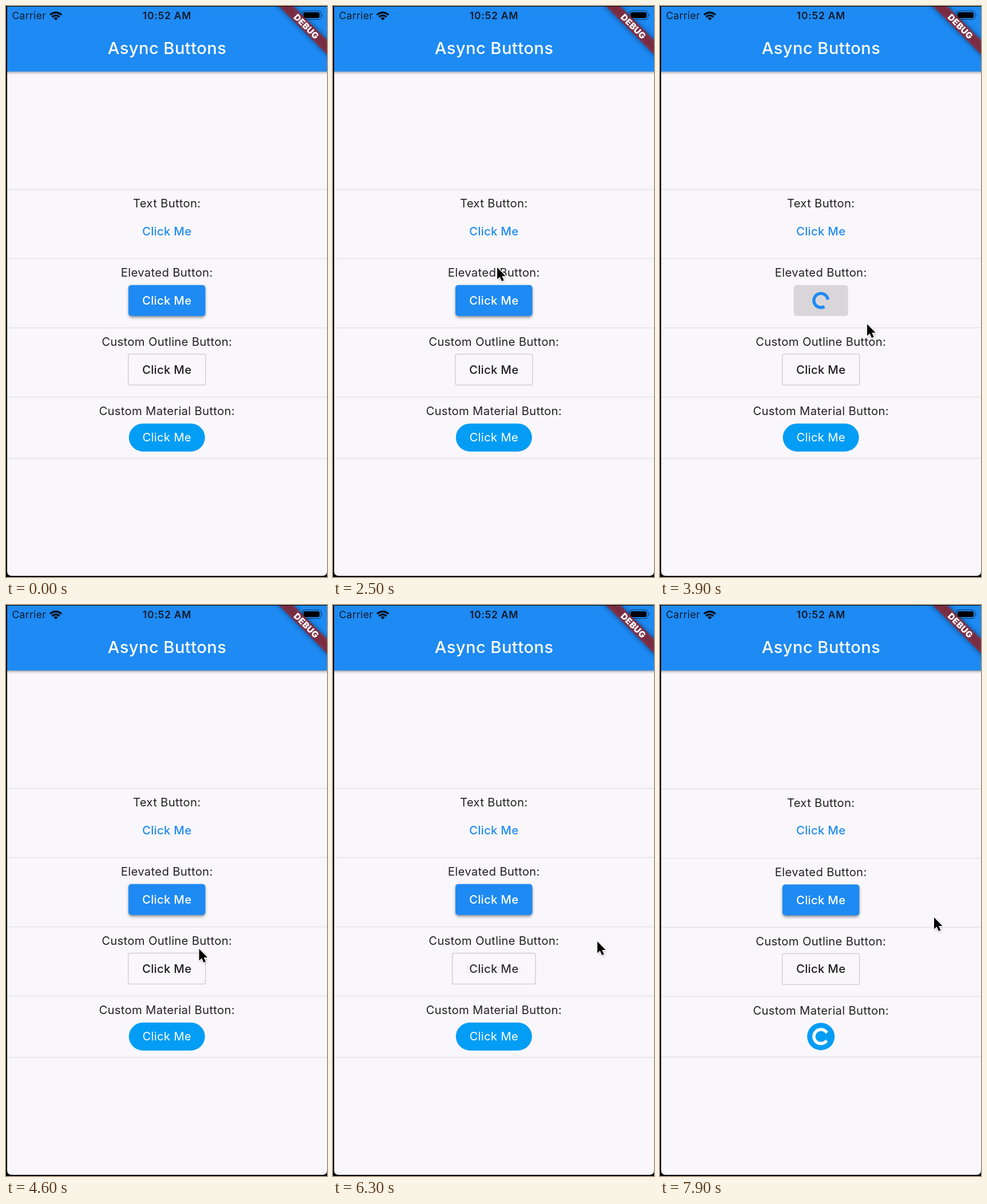
An HTML page for the animation above (8000 ms loop, 561 by 998 pixels).

```html
<!DOCTYPE html>
<html lang="en">
<head>
<meta charset="utf-8">
<title>Async Buttons</title>
<style>
  html, body { margin: 0; height: 100%; overflow: hidden; background: #000; }
  svg { display: block; width: 100vw; height: 100vh; }
  text { font: 400 20.3px Inter, Roboto, sans-serif; letter-spacing: .3px; text-anchor: middle; }
  .label { fill: #222124; }
  .medium { font-weight: 500; }
  .title { font-size: 29px; font-weight: 500; letter-spacing: .5px; fill: #fff; }
  .status { font-size: 17.4px; letter-spacing: .4px; fill: #0c1a2a; }
  .clock { font-weight: 600; letter-spacing: .8px; }
  .debug { font-size: 15.3px; font-weight: 900; fill: #fff; }
  .divider { stroke: #e5e3e7; stroke-width: 1.5; }
</style>
</head>
<body>
<svg viewBox="0 0 561 998" preserveAspectRatio="none">
  <defs>
    <filter id="blur" x="-20%" y="-60%" width="140%" height="220%"><feGaussianBlur stdDeviation="2.5"/></filter>
    <filter id="soft" x="-20%" y="-150%" width="140%" height="400%"><feGaussianBlur stdDeviation="5"/></filter>
    <clipPath id="screen"><path d="M2 1H561V988Q561 996 553 996H10Q2 996 2 988Z"/></clipPath>
  </defs>
  <g clip-path="url(#screen)">
    <rect width="561" height="998" fill="#f9f7fb"/>
    <rect x="-10" y="60" width="581" height="56" opacity=".42" filter="url(#blur)"/>
    <rect width="561" height="114.5" fill="#1e8af3"/>
    <text class="title" x="281.5" y="83.5">Async Buttons</text>
    <text class="status" x="40.3" y="23">Carrier</text>
    <text class="status clock" x="281.5" y="23">10:52 AM</text>
    <g transform="translate(87 25)" fill="none" stroke="#06101c" stroke-width="3.3">
      <path d="M-10-9.3A14 14 0 0 1 10-9.3"/>
      <path d="M-6.4-5.6A8.8 8.8 0 0 1 6.4-5.6"/>
      <path d="M0 0L-3.8-3.6A5.3 5.3 0 0 1 3.8-3.6Z" fill="#06101c" stroke="none"/>
    </g>
    <rect x="517.5" y="8.5" width="33" height="15" rx="4.5" fill="none" stroke="#000" stroke-opacity=".45" stroke-width="1.3"/>
    <rect x="520" y="11" width="28" height="10" rx="2.5"/>
    <path d="M552 13.5q2.5 2.5 0 5z" opacity=".5"/>
    <g id="list"></g>
    <g id="tail"></g>
    <g transform="translate(561 0) rotate(45)">
      <rect x="-90" y="41.9" width="180" height="18" opacity=".5" filter="url(#soft)"/>
      <rect x="-90" y="41.9" width="180" height="18" fill="#b71c1c" opacity=".63"/>
      <text class="debug" x="0" y="56.4">DEBUG</text>
    </g>
    <g id="cursor">
      <path d="M0 0V20.5L4.6 16.2 8 24 11.6 22.4 8.2 14.9H14.6Z" transform="translate(1 2)" opacity=".35" filter="url(#blur)"/>
      <path d="M0 0V20.5L4.6 16.2 8 24 11.6 22.4 8.2 14.9H14.6Z" stroke="#fff" stroke-width="2.6" paint-order="stroke"/>
    </g>
  </g>
</svg>
<script>
const LOOP = 8000, STEP = 100, FADE = 200, WAIT = 1000, CX = 281.2;
const $ = id => document.getElementById(id);
const clamp = v => Math.min(1, Math.max(0, v));
const mix = (a, b, p) => a + (b - a) * p;
const smooth = p => p * p * (3 - 2 * p);
const ease = p => (p = clamp(p), p < .5 ? 4 * p ** 3 : 1 - 4 * (1 - p) ** 3);
const rgba = (a, b, p) => `rgba(${a.map((v, i) => mix(v, b[i], p))})`;

function add(parent, tag, attrs, text) {
  const el = document.createElementNS('http://www.w3.org/2000/svg', tag);
  set(el, attrs);
  if (text) el.textContent = text;
  return parent.appendChild(el);
}
function set(el, attrs) {
  for (const k in attrs) el.setAttribute(k, attrs[k]);
}

const BLUE = '#1e8af3';
const CLEAR = [249, 247, 251, 0];
// w, h: size at rest; w2, h2: size while loading; start: when loading begins
const buttons = [
  { name: 'Text Button:', top: 320.7, y: 393.5, start: 1250, w: 135, w2: 95, h: 54, h2: 54, r: 5,
    fill: CLEAR, fill2: CLEAR, ink: BLUE, spin: BLUE, tap: [278, 394] },
  { name: 'Elevated Button:', top: 441.6, y: 514.7, start: 3200, w: 134.5, w2: 95, h: 54, h2: 54, r: 5,
    fill: [30, 138, 243, 1], fill2: [216, 214, 217, 1], ink: '#fff', spin: BLUE, tap: [283, 512], shadow: true },
  { name: 'Custom Outline Button:', top: 562.5, y: 635.5, start: 5120, w: 135, w2: 145.5, h: 54, h2: 54, r: 3,
    fill: CLEAR, fill2: [221, 219, 222, 1], ink: '#1d1c1f', tap: [303, 624], line: true },
  { name: 'Custom Material Button:', top: 683.4, y: 754.2, start: 7300, w: 133, w2: 48, h: 49, h2: 48, r: 25,
    fill: [4, 157, 245, 1], fill2: [4, 157, 245, 1], ink: '#fff', spin: '#fff', tap: [295, 748], plain: true }
];

function build(b, i) {
  const list = $('list'), holder = b.plain ? $('tail') : list;
  const base = b.y + (b.plain ? 6.8 : 7.1);
  add(list, 'path', { class: 'divider', d: `M2 ${b.top}H561` });
  add(list, 'text', { class: 'label', x: CX, y: b.top + 31.7 }, b.name);
  if (b.shadow) b.shade = add(holder, 'rect', { rx: b.r, filter: 'url(#blur)' });
  b.box = add(holder, 'rect', { rx: b.r });
  const clip = id => add(add(holder, 'clipPath', { id }), 'rect', { rx: b.r });
  b.edge = clip('edge' + i);
  b.inner = clip('inner' + i);
  const inkLayer = add(holder, 'g', { 'clip-path': `url(#edge${i})` });
  b.ripple = add(inkLayer, 'circle', { cx: b.tap[0], cy: b.tap[1], fill: b.ink });
  const content = add(holder, 'g', { 'clip-path': `url(#inner${i})` });
  b.idle = add(content, 'text', { class: b.plain ? '' : 'medium', x: CX, y: base, fill: b.ink }, 'Click Me');
  b.busy = b.spin
    ? add(content, 'path', { fill: 'none', stroke: b.spin, 'stroke-width': 5.4, 'stroke-linecap': 'square' })
    : add(content, 'text', { class: 'medium', x: CX, y: base, fill: '#878589' }, 'Loading...');
}
buttons.forEach(build);
const lastLine = add($('tail'), 'path', { class: 'divider', d: 'M2 790.8H561' });

// cubic-bezier(.4, 0, .2, 1)
function swift(x) {
  let lo = 0, hi = 1, u = .5;
  for (let i = 0; i < 20; i++) {
    u = (lo + hi) / 2;
    const v = 1.2 * u * (1 - u) ** 2 + .6 * u * u * (1 - u) + u ** 3;
    if (v < x) lo = u; else hi = u;
  }
  return 3 * u * u * (1 - u) + u ** 3;
}

function spinner(ms, cy) {
  const R = 12.3, p = ms / 1333 % 1;
  const head = swift(clamp(p * 2)), tail = swift(clamp(p * 2 - 1));
  const from = Math.PI * (-.5 + tail * 1.5 + ms / 2222 * 2 + p * .5);
  const sweep = Math.max((head - tail) * 1.5 * Math.PI, .01);
  const at = a => `${CX + R * Math.cos(a)} ${cy + R * Math.sin(a)}`;
  return `M${at(from)}A${R} ${R} 0 ${+(sweep > Math.PI)} 1 ${at(from + sweep)}`;
}

function setBox(el, w, h, y) {
  set(el, { x: CX - w / 2, y: y - h / 2, width: w, height: h });
}

function drawButton(b, t) {
  const on = t - b.start, off = on - WAIT;
  const load = clamp(on / FADE) - clamp(off / FADE);
  // The larger content rules the size until it has faded out.
  const size = b.spin
    ? ease((on - FADE) / 250) - ease(off / 250)
    : ease(on / 400) - ease((off - FADE) / 400);
  const w = mix(b.w, b.w2, size), h = mix(b.h, b.h2, size);
  setBox(b.box, w, h, b.y);
  setBox(b.edge, w, h, b.y);
  setBox(b.inner, mix(87, b.spin ? 46 : 97, size), 44, b.y);
  b.box.setAttribute('fill', rgba(b.fill, b.fill2, load));
  if (b.line) set(b.box, { stroke: rgba([209, 208, 211, 1], [196, 195, 198, 1], load), 'stroke-width': 1.5 });
  if (b.shade) {
    setBox(b.shade, w - 1, h, b.y + 2.5);
    b.shade.setAttribute('opacity', .45 * (1 - load));
  }
  const held = on + 120;
  set(b.ripple, {
    r: Math.min(80, Math.max(0, held * .28)),
    opacity: held > 0 ? .12 * (1 - clamp(on / FADE)) : 0
  });
  b.idle.setAttribute('opacity', 1 - load);
  b.busy.setAttribute('opacity', load);
  if (b.spin && load > 0) b.busy.setAttribute('d', spinner(on, b.y));
  return size;
}

// time, x, y
const path = [
  [400, 296, 427], [600, 278, 393], [1500, 278, 393], [2000, 325, 425], [2500, 287, 457],
  [2900, 283, 512], [3300, 283, 512], [3900, 362, 556], [4300, 372, 578], [4900, 303, 624],
  [5200, 303, 624], [5300, 308, 618], [5900, 452, 582], [6300, 462, 588], [6900, 295, 748],
  [7300, 295, 748], [7900, 479, 546]
];

function drawCursor(t) {
  const cursor = $('cursor');
  cursor.setAttribute('visibility', t < path[0][0] ? 'hidden' : 'visible');
  const i = path.findIndex(k => k[0] > t);
  const b = path[i < 0 ? path.length - 1 : i], a = i > 0 ? path[i - 1] : b;
  const p = a === b ? 1 : smooth((t - a[0]) / (b[0] - a[0]));
  cursor.setAttribute('transform', `translate(${mix(a[1], b[1], p)} ${mix(a[2], b[2], p)})`);
}

function draw(t) {
  const sizes = buttons.map(b => drawButton(b, t));
  const drop = sizes[3] * .8;
  $('list').setAttribute('transform', `translate(0 ${drop})`);
  lastLine.setAttribute('transform', `translate(0 ${-drop})`);
  drawCursor(t);
}

const begin = performance.now();
function tick() {
  const t = (performance.now() - begin) % LOOP;
  draw(Math.floor(t / STEP) * STEP);
  requestAnimationFrame(tick);
}
tick();
</script>
</body>
</html>
```
